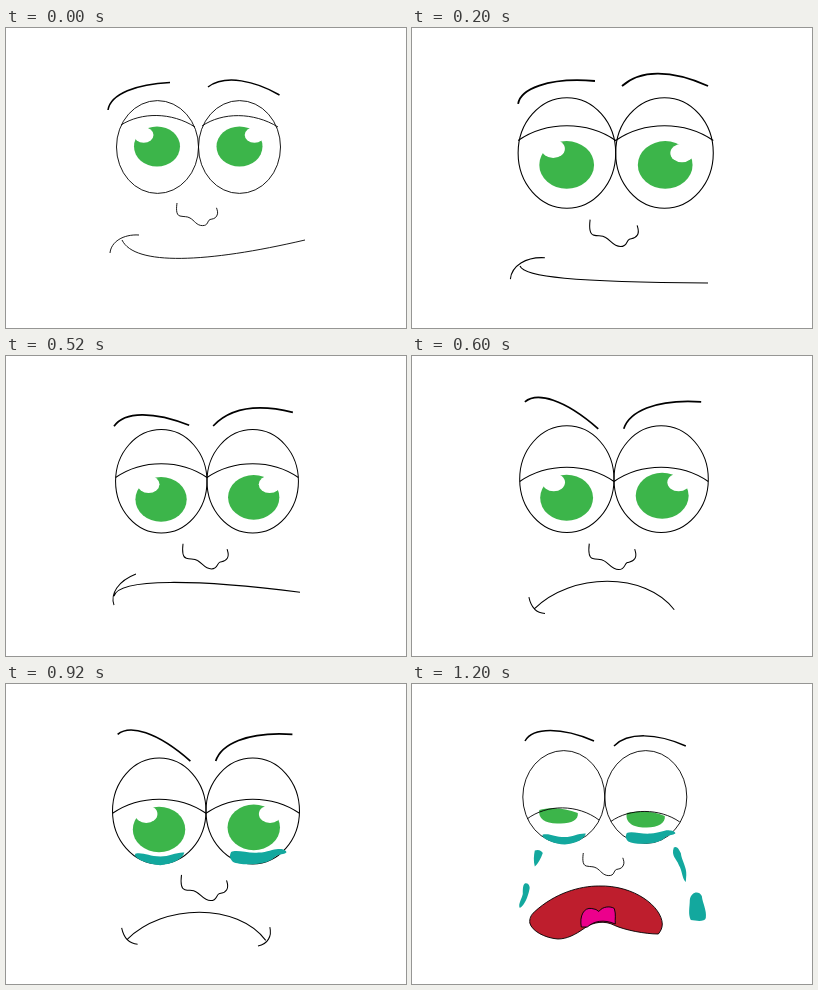
Animation of 400x300 px, one loop 1.4 s. Source, as an HTML page without scripts:

```html
<!DOCTYPE html>
<html lang="en">
<head>
<meta charset="utf-8">
<title>Moody face</title>
<style>
  html, body { margin: 0; width: 100%; height: 100%; overflow: hidden; background: #fff; }
  svg { display: block; width: 100%; height: 100%; fill: none; stroke: #000; stroke-width: .9; }
  .brow { stroke-width: 1.5; }
  .iris { fill: #3cb54a; stroke: none; }
  .glint { fill: #fff; stroke: none; }
  .tear { fill: #13a89e; stroke: none; }
  .lips { fill: #be1e2d; }
  .tongue { fill: #ec008c; }

  .pose { visibility: hidden; animation: show 1.4s step-end infinite; animation-delay: calc(var(--i) * .2s - 1.4s); }
  @keyframes show {
    0% { visibility: visible; }
    14.2857%, 100% { visibility: hidden; }
  }
</style>
</head>
<body>
<svg viewBox="0 0 400 300">
  <!-- All parts are drawn around the point where the eyes touch -->
  <defs>
    <g id="face">
      <ellipse cx="-41" rx="41" ry="46.4"/>
      <ellipse cx="41" rx="41" ry="46.4"/>
      <path d="M-21.5 56C-22 60-23 68-18.5 69C-14 70-11.5 69.2-8.5 71C-4 73.5-2 78.6 4 78.6C10 78.6 8.5 74 11.5 72.5C14 71.8 16.5 72 18.2 69C20 66 18.8 63.5 18 60.8"/>
    </g>
    <path id="lids" d="M-82 0C-58-16.5-24-16.5 0 0C24-16.5 58-16.5 82 0"/>
    <ellipse id="iris" class="iris" rx="23" ry="20"/>
    <ellipse id="glint" class="glint" rx="9.8" ry="7.8"/>
    <g id="gaze">
      <use href="#iris" x="-41.2" y="16.2"/>
      <use href="#iris" x="41.9" y="14.4"/>
      <use href="#glint" x="-52.4" y="2.7"/>
      <use href="#glint" x="56.2" y="2.7"/>
    </g>
    <g id="upset">
      <use href="#gaze"/>
      <use href="#lids" y="2"/>
      <use href="#face"/>
      <path class="brow" d="M-77.5-67.2C-67-76-43.5-70-13.7-43.8M8.5-43.8C13-58 34.8-70 75.8-67.3"/>
    </g>
    <path id="smirk" d="M-88.5 106C-87.5 95-75.5 87-59.5 88"/>
    <path id="frown" d="M-69.6 113C-37 80.6 27.5 80.6 52.4 113.5M-74 102.6C-72 112-68 116.5-60 116.8"/>
    <path id="welling" class="tear" d="M-62 37.5C-55 36-50 40-40 40C-32 40-26 36-19 36.5C-20 42-30 47-40 47.5C-50 47-60 43-62.5 39Z
      M22 36C27 33.5 37 37.5 46 36.5C55 36 60 32.5 65 33.4C68 33.4 71 35 70.5 36.5C68 38.5 65 37.5 61 40C57 44 52 45.5 46 46.2C38 47.2 28 47 23.5 44.5C21.5 42.5 20 40 22 36Z"/>
    <g id="sob">
      <use href="#welling"/>
      <path class="tear" d="M-70 53.5C-66 52-63 54-62 56C-64 62-67 67-70 69.5C-71.5 64-71 58-70 53.5Z
        M69 50.5C72 48.5 74 52 76 56C77 64 82 70 81.5 78L81 85C77 81 78 75 74 68C72 62 66 59 69 50.5Z"/>
      <path class="lips" d="M-70.5 115C-50 96-25 89-6 89C30 88 57 110 57.5 127C57.5 131 56 134 53.5 137C40 137 20 133 10 128.5C0 123-12 125-20 131C-30 138-38 142-47 142C-60 141-73 134-75 126C-75.5 122-74 118-70.5 115Z"/>
      <path class="tongue" d="M-23.5 130C-25.5 119-21 110-13 111.5Q-8 112-6 114.5C-2 109 6 109 9.5 111.5C11.5 118 10 122 10.5 127C-1 122-11 124-17.5 130Z"/>
    </g>
  </defs>

  <g class="pose" style="--i:0" transform="translate(192.5 119)">
    <use href="#iris" x="-41.5" y="-.5"/>
    <use href="#iris" x="41" y="-.5"/>
    <use href="#glint" x="-54.8" y="-12"/>
    <use href="#glint" x="56" y="-12"/>
    <path d="M-77.5-22C-57-35-27-35-3.5-20M3.5-21C24-35 55-35 79.5-20"/>
    <use href="#face"/>
    <path class="brow" d="M-90.5-37C-88-53-62-63-28.5-64.5M9.5-60C27-73 57-66 81-52"/>
    <use href="#smirk"/>
    <path d="M-76.5 93C-64 119 8 116 106.5 93"/>
  </g>

  <g class="pose" style="--i:1" transform="translate(203.7 125) scale(1.19)">
    <use href="#iris" x="-41.2" y="10"/>
    <use href="#iris" x="41.6" y="10"/>
    <use href="#glint" x="-52.5" y="-3.6"/>
    <use href="#glint" x="55.7" y="0"/>
    <use href="#lids" y="-10.5"/>
    <use href="#face"/>
    <path class="brow" d="M-82-41.2C-80.4-53-57.7-64-17.4-60.5M5.3-56.3C20.4-69.7 45.6-70.6 77.6-56.3"/>
    <use href="#smirk"/>
    <path d="M-80.4 95C-77 104.2-36.7 108.4 77.6 109.2"/>
  </g>

  <g class="pose" style="--i:2" transform="translate(201 125.3) scale(1.115)">
    <use href="#gaze"/>
    <use href="#lids" y="-3.4"/>
    <use href="#face"/>
    <path class="brow" d="M-83.4-49.3C-74-62.8-48-62.8-16-50.2M5.5-49.6C21-66 46-69.5 77-61.8"/>
    <path d="M-83.4 103C-79.8 86.3-8 88 83.4 99.4M-83.4 111C-87 101-79.8 89.5-63.7 83.2"/>
  </g>

  <g class="pose" style="--i:3" transform="translate(202 123.2) scale(1.15)">
    <use href="#upset"/>
    <use href="#frown"/>
  </g>

  <g class="pose" style="--i:4" transform="translate(200 127) scale(1.14)">
    <use href="#upset"/>
    <use href="#welling"/>
    <use href="#frown"/>
    <path d="M56 101.8C57.9 109.6 54.4 116.7 45.6 118.4"/>
  </g>

  <g class="pose" style="--i:5" transform="translate(200 101.5) scale(1.4)">
    <use href="#upset"/>
    <use href="#glint" x="-25" y="25.4"/>
    <use href="#glint" x="25.5" y="24"/>
    <use href="#sob"/>
  </g>

  <g class="pose" style="--i:6" transform="translate(192.8 113)">
    <path class="iris" d="M-65.5 13C-56 10-40 10.5-27 16C-26 23-34 27-46 26.5C-59 27-67 22-65.5 13Z
      M22 16C34 13.5 49 14 60 19C61 26 53 30.5 42 30.5C29 31 20 26 22 16Z"/>
    <path d="M-77.8 22C-58 7-27 7-5.8 23M6 24.5C25 11 55 11 75 25"/>
    <use href="#face"/>
    <path class="brow" d="M-79.8-56C-72-70-43-70-10.8-56M9.2-51C23-65 52-64 81-51"/>
    <use href="#sob"/>
    <path class="tear" d="M-80 86.5C-77 85-74 89-75.5 93C-77 100-80 108-85 111C-87 107-83 102-82 97C-82 92-82 88-80 86.5Z
      M85 103C86 95 94 93 97 99C98 107 102 113 101 121C100 125 92 124 86 123C83 117 85 110 85 103Z"/>
  </g>
</svg>
</body>
</html>
```
